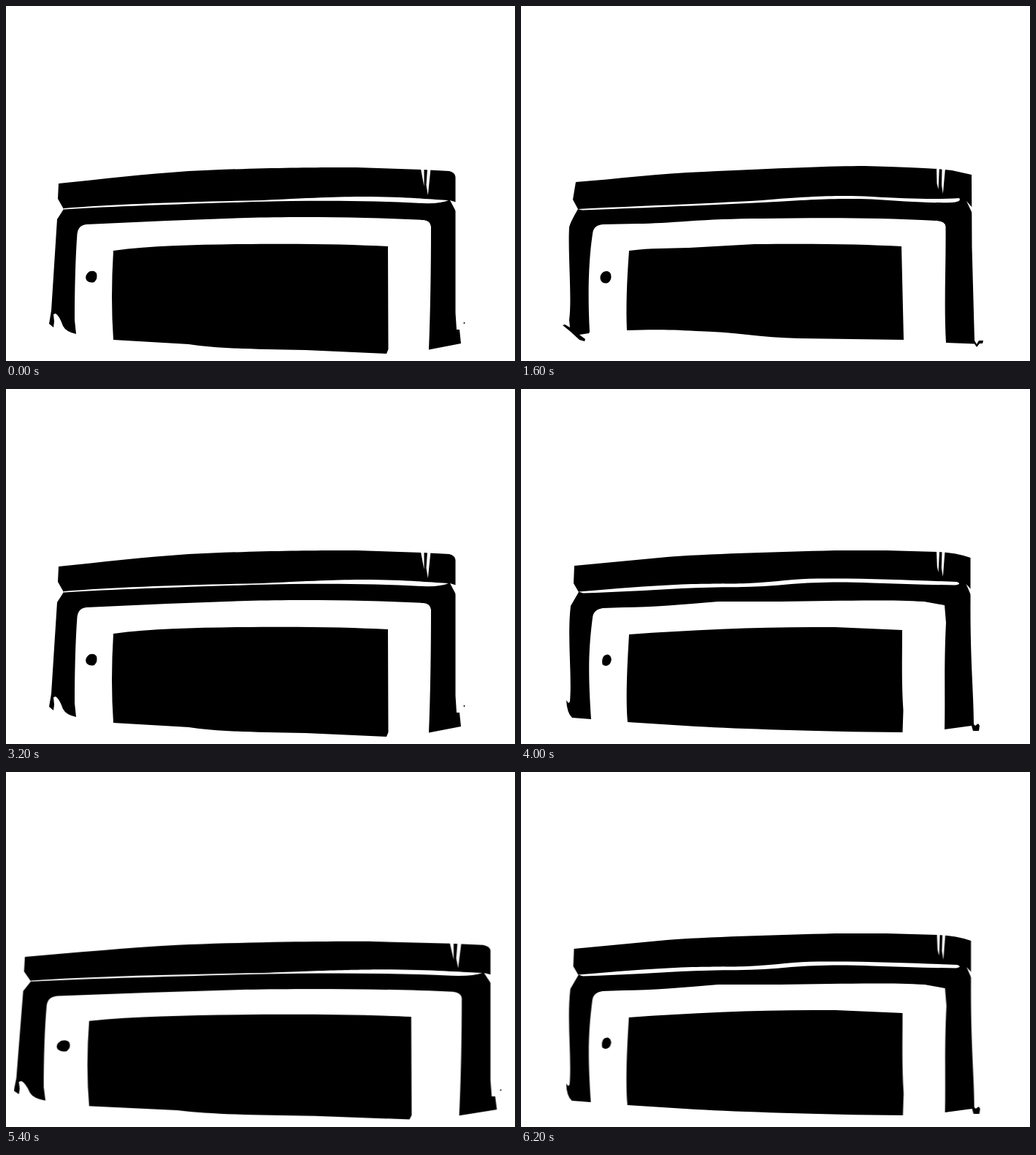
These frames come from a looping animation (697x486 px, 6400 ms). An HTML page:

```html
<!DOCTYPE html>
<html lang="en">
<head>
<meta charset="utf-8">
<title>Wobbling oven</title>
<style>
  html, body { margin: 0; width: 100%; height: 100%; overflow: hidden; background: #fff; }
  svg { display: block; width: 100%; height: 100%; }
  .cut { fill: #fff; }

  .pose, .drawing { animation: 6400ms step-end infinite; }
  .drawing { visibility: hidden; }
  .pose { animation-name: squash; }
  .a { animation-name: show-a; }
  .b { animation-name: show-b; }
  .c { animation-name: show-c; }
  .d { animation-name: show-d; }

  @keyframes show-a {
    0%, 50%, 75% { visibility: visible; }
    12.5%, 62.5%, 87.5%, 100% { visibility: hidden; }
  }
  @keyframes show-b {
    0%, 37.5%, 100% { visibility: hidden; }
    25% { visibility: visible; }
  }
  @keyframes show-c {
    0%, 50%, 100% { visibility: hidden; }
    37.5% { visibility: visible; }
  }
  @keyframes show-d {
    0%, 25%, 75% { visibility: hidden; }
    12.5%, 62.5%, 87.5%, 100% { visibility: visible; }
  }
  /* wide squash, then a tall stretch, then rest */
  @keyframes squash {
    0% { transform: matrix(1, 0, 0, 1, 0, 0); }
    75% { transform: matrix(1.175, 0, 0, .955, -59.4, 21); }
    78.125% { transform: matrix(1.2, 0, 0, .95, -67.8, 24.5); }
    84.375% { transform: matrix(1.173, 0, 0, .955, -58.6, 21); }
    87.5% { transform: matrix(.957, 0, 0, 1.022, 14.6, -10.9); }
    90.625% { transform: matrix(.94, 0, 0, 1.04, 20.4, -19.3); }
    96.875%, 100% { transform: matrix(1.002, 0, 0, 1, -.6, 0); }
  }
</style>
</head>
<body>
<svg viewBox="0 0 697 486" preserveAspectRatio="none">
  <g class="pose">

    <g class="drawing a">
      <path d="M72 243 C130 237 190 230 250 226 C340 221.5 430 220.5 480 221 L570 224 L607 226 Q615 228 615.5 234
        L615.5 420 L617 443 L621 443 L623 462 L579 470.5 C581 420 582 360 582 302 Q581 294 572 293
        C500 289 400 288 330 290 L220 294 L110 299 Q99 300 97.500 312 C95 345 94 390 94 430 L96 449
        Q82 446 78 438 Q73 424 68 421 L65 422 L66 432 L65 440 L59 435 L62 417 L70 292 L79 278 L71 264 Z"/>
      <path d="M147 335 C200 328 260 327 320 326 C400 325 470 326 523 329 L523.5 470 L521 476 L410 471
        C340 470 290 469 250 463 L147 457 Q143 400 147 335 Z"/>
      <path d="M114 363.500 Q121 361 124 366 Q126 373 121 378 Q114 380 110 375 Q107 369 114 363.500 Z"/>
      <circle cx="627.5" cy="434" r="1"/>
      <g class="cut">
        <path d="M79 277 C150 271 250 268 350 266 C430 262 460 261 500 261 C560 262 585 265 606 266
          Q595 271 570 270 C500 266 420 266 340 268 C250 271 150 274 79 278.500 Z"/>
        <path d="M608 266 L616 268.500 V281 Z"/>
        <path d="M568 223 H572.500 V247 Z M577 223 H581.500 L577.800 259 L575.500 245 Z"/>
      </g>
    </g>

    <g class="drawing b">
      <path d="M75 241 C130 237 190 229 250 227 C350 222 430 219 470 219 C520 220 550 222 570 223 L590 225 L617 231
        L617.500 330 L621 458 L624 463 L627 458 H633 L632 462 L628 462 L624 467 L621 462.500 L582 461
        C579 410 582 360 581.500 302 Q581 295 570 294 C480 289 400 290 330 291 C250 291 200 298 160 298
        L112 299 Q99 300 98 312 C93 345 91 390 94 446 L93 448 L80 450 L88 456 L87 459 L80 457 L68 446 L57 437
        L60 436 L67 440 L66 430 C70 400 64 340 66 303 Q67 297 78 278 L71 265 Z"/>
      <path d="M148 335 C180 331 200 332 230 331 L320 326 C400 325 470 326 521 329 L524 457 L380 455
        C330 454 290 446 240 445 C200 443 180 443 145 444 Q143 400 148 335 Z"/>
      <path d="M113 364 Q120 361 123 367 Q125 375 119 379 Q112 381 109 375 Q107 368 113 364 Z"/>
      <g class="cut">
        <path d="M78 278 C150 274 250 271 330 266 C400 260 440 259 480 261 C530 264 570 265 600 263
          Q604 268 590 269 C560 270 520 267 480 264.500 C430 263 400 265 330 269 C250 273 150 277 84 279.500 Z"/>
        <path d="M610 267 L618 276 V284 Z"/>
        <path d="M569 222 H572.800 L571.500 251 L569.500 243 Z M576.500 222 H581 L577.800 257 L576 245 Z"/>
      </g>
    </g>

    <g class="drawing c">
      <path d="M75 240.500 C200 231 300 224 380 221 C450 218 490 218 520 220 L570 223 L608 227 Q617 229 617.500 233
        L617.500 330 C615 380 618 420 621 462 L582 464 C579 410 582 360 582 302 Q581 294 570 293
        C480 289 400 289 330 291 C250 293 180 295 113 299 Q100 301 99 312 C95 345 93 390 96 447
        L69 437 L67 433 L69 431 C66 400 64 330 66 299 L78 277 L71 265 Z"/>
      <path d="M150 337 L330 327 C400 326 460 326 490 326 Q520 328 522 333 C522 370 526 400 524 466
        C470 468 420 468 340 474.500 C290 475 220 467 146 460 C145 420 147 370 150 337 Z"/>
      <path d="M117 366.500 Q125 364 127 369 Q127 377 120 378 Q113 377 115 370 Z"/>
      <path d="M607 219 Q612 219 615 222 Q611 221 607 219 Z"/>
      <g class="cut">
        <path d="M78 276 C150 272 250 270 330 266 C390 260 440 258 480 260 C520 262 560 265 598 262.500
          Q602 267 588 268.500 C560 270 520 266 480 264 C430 263 390 263 330 268 C250 273 150 275 78 277 Z"/>
        <path d="M611 267 L618 275 V284 Z"/>
        <path d="M569 222 H573 L571 251 L569.500 243 Z M576.500 222 H581 L577.800 257 L576 245 Z"/>
      </g>
    </g>

    <g class="drawing d">
      <path d="M73 242 L200 230 C250 226 350 223 430 221 L500 221 L570 223 Q595 224 615.500 231 L615.500 290
        C615 370 620 420 620 459 L622 461 L626 458 L628 461 L627 468 L619 468 L617 461 L580 466
        C581 420 579 380 582 320 L580 296 L552 291 C500 288 430 290 355 291 L270 291 C220 295 180 299 140 299
        L112 300 Q99 302 98 313 C92 360 92 390 96 452 L70 450 Q63 444 62 426 L65 430 L67 428
        C70 390 63 340 68 297 L79 278 L72 266 Z"/>
      <path d="M148 336 C230 330 320 326 400 326 L430 326 L522 330 C522 370 521 400 523.500 440 L522.500 470
        C400 469 300 465 240 462 L146 456 C143 420 146 370 148 336 Z"/>
      <path d="M114 365 Q120 361 123 367 Q125 372 121 377 Q116 381 111.500 377 Q110 369 114 365 Z"/>
      <g class="cut">
        <path d="M79 277.500 C130 273 170 270 220 267.500 C260 266 280 267 310 266 C350 264 380 259 410 259.500
          C480 259 540 262 597 264 Q604 267 595 268.500 C560 268 520 267 480 265.500 C430 263.500 400 265 370 267
          C320 273 270 270 220 273 C170 276 130 278 85 279.500 Z"/>
        <path d="M609.500 267 L616 274 V282 Z"/>
        <path d="M569 222 H573 L571.500 251 L569.800 243 Z M576.500 222 H580.500 L577.800 257 L575.800 245 Z"/>
      </g>
    </g>

  </g>
</svg>
</body>
</html>
```
